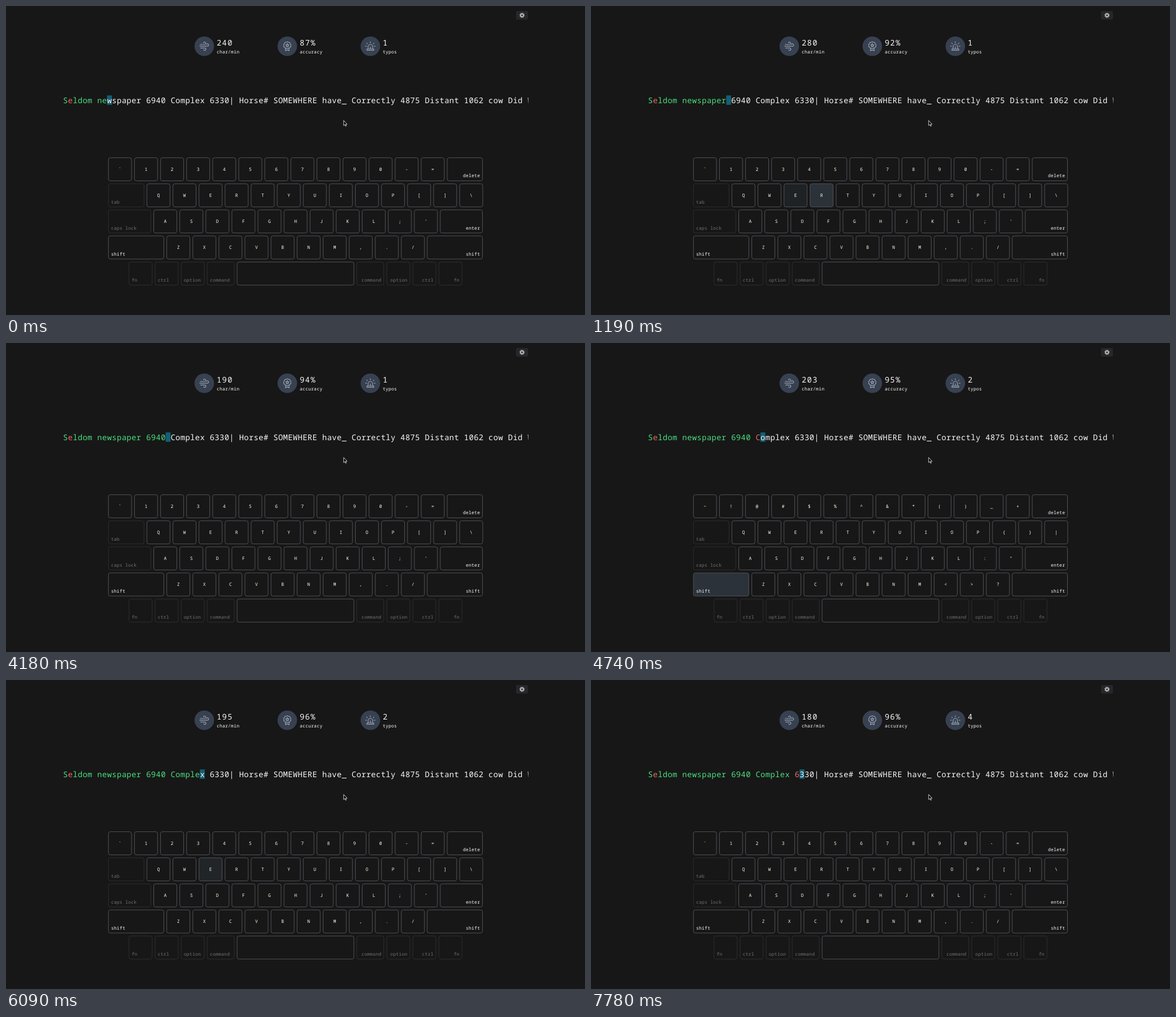
Write an HTML page that moves like this. It is 1025x547 px and loops after 8000 ms.

```html
<!DOCTYPE html>
<html lang="en">
<head>
<meta charset="utf-8">
<title>Typing practice</title>
<style>
  html, body { margin: 0; width: 100%; height: 100%; overflow: hidden; background: #171717; }
  svg { display: block; width: 1025px; height: 547px; }
  text {
    font: 8.07px "Noto Sans Mono", monospace;
    letter-spacing: .025em;
    fill: #f8f8f8;
    white-space: pre;
    text-rendering: geometricPrecision;
  }
  .line { font-size: 13.84px; }
  .value { font-size: 13.84px; letter-spacing: .1em; }
  .good { fill: #4ade80; }
  .bad { fill: #f26666; }
  .key rect { fill: #171717; stroke: #52525b; stroke-width: 1; }
  .off { opacity: .4; }
  .icon { fill: none; stroke: #9ca3af; stroke-width: 1.5; stroke-linecap: round; stroke-linejoin: round; }
</style>
</head>
<body>
<svg id="stage" viewBox="0 0 1025 547">
  <clipPath id="view"><rect x="100" y="150" width="824.6" height="40"/></clipPath>
  <rect x="903" y="9" width="21" height="15" rx="2" fill="#27272a"/>
  <g fill="none" stroke="#b4b4bc">
    <circle cx="913.5" cy="16.4" r="2.5" stroke-width="2"/>
    <circle cx="913.5" cy="16.4" r="3.8" stroke-width="1.4" stroke-dasharray="1.6 1.385"/>
  </g>
</svg>
<script>
const LOOP = 8000, CHAR = 8.65, LEFT = 101, UNIT = 41.5, STEP = 46.14;
const TEXT = 'Seldom newspaper 6940 Complex 6330| Horse# SOMEWHERE have_ Correctly 4875 Distant 1062 cow Did W';
const LOWER = "`1234567890-=[]\\;',./", UPPER = '~!@#$%^&*()_+{}|:"<>?';

// time, caret position, 1 when the last character is wrong
const typing = [
  [-200, 8], [-50, 9], [110, 10], [290, 11], [490, 12], [640, 13], [720, 14],
  [1020, 15], [1190, 16], [1510, 17], [2790, 18], [2900, 19], [4090, 20],
  [4180, 21], [4290, 22], [4650, 23, 1], [5090, 22], [5550, 23], [5620, 24],
  [5680, 25], [5750, 26], [5910, 27], [6090, 28], [6400, 29, 1], [7340, 28],
  [7410, 29], [7550, 30], [7780, 31, 1]
];
// the speed and accuracy refresh about every half second
const ticks = [-100, 400, 930, 1450, 1890, 2430, 2900, 3440, 3910, 4340,
  4830, 5370, 5820, 6330, 6790, 7270, 7780];
// key, then time and glow level pairs
const glows = [
  ['W', 110, 1, 200, .4, 290, 0], ['S', 290, 1, 400, .4, 490, 0],
  ['A', 640, 1, 720, .5, 780, 0], ['E', 1020, 1, 1100, .8, 1190, .4, 1280, 0],
  ['R', 1190, 1, 1280, 0], [' ', 1510, .8, 1660, 0],
  ['shift', 4570, .4, 4650, 1, 4770, .4, 4830, 0],
  ['shift', 5370, .2, 5460, 1, 5620, .4, 5680, 0],
  ['C', 5550, 1, 5620, .4, 5680, 0], ['E', 6090, .5, 6150, 0],
  ['S', 6400, 1, 6480, .4, 6560, 0], ['X', 7410, 1, 7480, .4, 7550, 0]
];
const shifts = [[4570, 4770], [5370, 5620]];

const stage = document.getElementById('stage');
function add(parent, tag, attrs, content = '') {
  const el = document.createElementNS('http://www.w3.org/2000/svg', tag);
  for (const name in attrs) el.setAttribute(name, attrs[name]);
  el.textContent = content;
  return parent.appendChild(el);
}

// statistics
const icons = [
  'M3 8h9.5a2.6 2.6 0 1 0-2.3-3.8M2 12h17a2.7 2.7 0 1 0-2.4-4M4 16h9a2.6 2.6 0 1 1-2.4 3.6',
  'M12 2l2.3 1.3 2.7.2 1.1 2.4 1.9 1.9-.4 2.7.4 2.6-2.3 1.5-1.7 2.1-2.7-.1-1.3.4-1.3-.4-2.7.1-1.7-2.1-2.3-1.5.4-2.6L4 7.8l1.9-1.9L7 3.500l2.700-.2zM8 16.500v5.500l4-2 4 2v-5.500M12 6.200l1.100 2.300 2.500.3-1.800 1.800.4 2.500-2.200-1.200-2.200 1.200.4-2.500-1.800-1.800 2.500-.3z',
  'M7 18v-5a5 5 0 0 1 10 0v5M4.500 21v-3h15v3zM12 18v-5M12 2v2.500M4 5l1.500 1.500M20 5l-1.500 1.500M1.500 12h2M20.500 12h2'
];
const stats = ['char/min', 'accuracy', 'typos'].map((name, i) => {
  const x = 351 + i * 147;
  add(stage, 'circle', { cx: x, cy: 71.2, r: 17.3, fill: '#374151' });
  add(stage, 'path', { class: 'icon', d: icons[i], transform: `translate(${x - 9.6} 61.6) scale(.8)` });
  add(stage, 'text', { x: x + 21.9, y: 84.2 }, name);
  return add(stage, 'text', { class: 'value', x: x + 21.9, y: 70 });
});

// text line
const line = add(stage, 'g', { 'clip-path': 'url(#view)' });
const caret = add(line, 'rect', { y: 158.3, width: CHAR, height: 16.6, fill: '#155e75' });
const lineText = add(line, 'text', { class: 'line', x: LEFT, y: 171.6 });
const chars = [...TEXT].map(c => add(lineText, 'tspan', {}, c));

// keyboard
const keys = {}, symbols = [];
function addKey(label, x, y, w, { off, side } = {}) {
  const g = add(stage, 'g', { class: off ? 'key off' : 'key' });
  const rect = add(g, 'rect', { x: x + .3, y: y + .3, width: w - .6, height: UNIT - .6, rx: 3.4 });
  const pos = side === 'left' ? { x: x + 5, y: y + 35.1 }
    : side === 'right' ? { x: x + w - 4.6, y: y + 35.1, 'text-anchor': 'end' }
    : { x: x + w / 2 + .1, y: y + 23.6, 'text-anchor': 'middle' };
  const text = add(g, 'text', pos, label);
  const at = LOWER.indexOf(label);
  if (at >= 0) symbols.push({ text, at });
  keys[label] ??= rect;
}
function addRun(labels, x, y) {
  [...labels].forEach((c, i) => addKey(c, x + i * STEP, y, UNIT));
}
const rowY = i => 268.3 + i * STEP;
const L = 181, R = 843.8;
addRun('`1234567890-=', L, rowY(0));
addKey('delete', 780.8, rowY(0), R - 780.8, { side: 'right' });
addKey('tab', L, rowY(1), 63.6, { off: true, side: 'left' });
addRun('QWERTYUIOP[]\\', 249.1, rowY(1));
addKey('caps lock', L, rowY(2), 75.6, { off: true, side: 'left' });
addRun("ASDFGHJKL;'", 261.2, rowY(2));
addKey('enter', 768.5, rowY(2), R - 768.5, { side: 'right' });
addKey('shift', L, rowY(3), 98.7, { side: 'left' });
addRun('ZXCVBNM,./', 284.3, rowY(3));
addKey('shift', 745.4, rowY(3), R - 745.4, { side: 'right' });
['fn', 'ctrl', 'option', 'command'].forEach((name, i) => {
  const w = name === 'command' ? 48.4 : UNIT, x = 217.5 + i * STEP;
  addKey(name, x, rowY(4), w, { off: true, side: 'left' });
  addKey(name, 1025 - x - w, rowY(4), w, { off: true, side: 'right' });
});
addKey(' ', 408.8, rowY(4), 207.4);

// pointer
add(stage, 'path', {
  d: 'M597.800 202.600v9l2-1.800 1.400 3.100 1.300-.6-1.400-3h2.700z',
  fill: '#000', stroke: '#fff', 'stroke-width': .8, 'stroke-linejoin': 'round'
});

function typedBy(t, inclusive) {
  const bad = new Set([1]);
  let pos = 0, typos = 1;
  for (const [time, next, wrong] of typing) {
    if (time > t || (time === t && !inclusive)) break;
    for (let i = next; i < pos; i++) bad.delete(i);
    pos = next;
    if (wrong) { bad.add(pos - 1); typos++; }
  }
  return { pos, bad, typos };
}

function set(el, value) {
  if (el.textContent !== value) el.textContent = value;
}

function draw(t) {
  const now = typedBy(t, true);
  caret.setAttribute('x', LEFT + now.pos * CHAR);
  chars.forEach((el, i) =>
    el.setAttribute('class', i >= now.pos ? '' : now.bad.has(i) ? 'bad' : 'good'));

  const tick = ticks.filter(time => time <= t).length - 1;
  const { pos, bad } = typedBy(ticks[tick], false);
  set(stats[0], String(Math.floor(pos * 60 / (2 + tick / 2))));
  set(stats[1], Math.floor(100 * (pos - bad.size) / pos) + '%');
  set(stats[2], String(now.typos));

  const upper = shifts.some(([from, to]) => t >= from && t < to);
  for (const { text, at } of symbols) set(text, (upper ? UPPER : LOWER)[at]);

  const levels = {};
  for (const [key, ...steps] of glows) {
    levels[key] ??= 0;
    for (let i = 0; i < steps.length; i += 2) if (t >= steps[i]) levels[key] = steps[i + 1];
  }
  for (const key in levels) {
    const mix = [20, 27, 34].map(d => Math.round(23 + d * levels[key]));
    keys[key].style.fill = `rgb(${mix})`;
  }
}

const start = performance.now();
function frame() {
  draw((performance.now() - start) % LOOP);
  requestAnimationFrame(frame);
}
frame();
</script>
</body>
</html>
```
